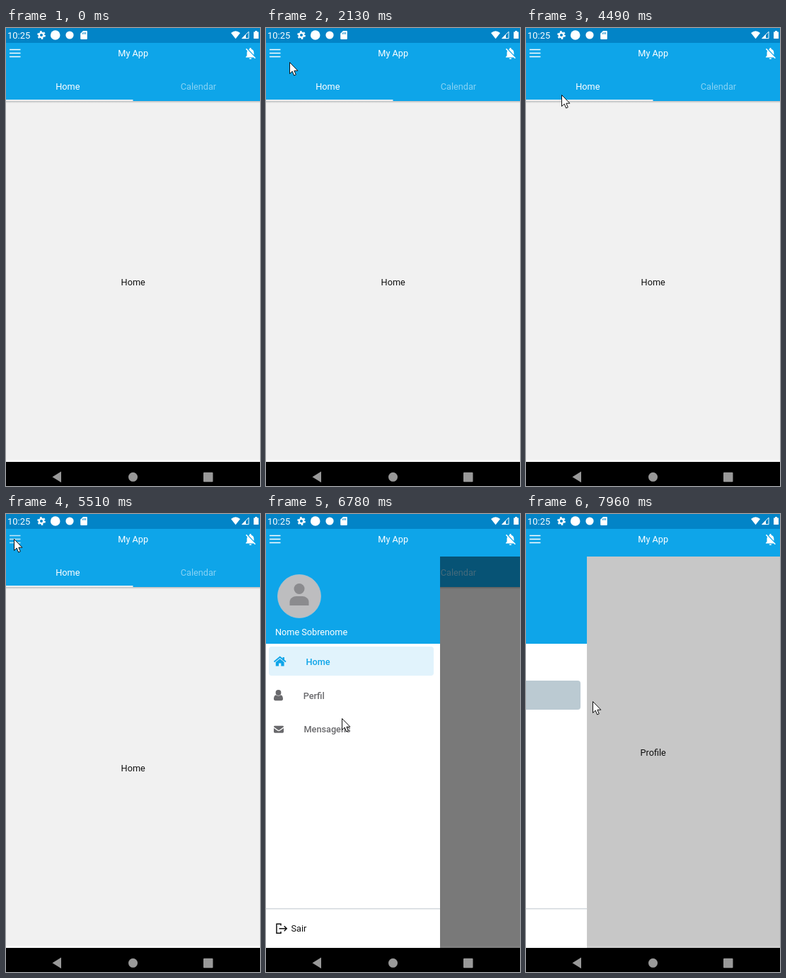
An HTML page for the animation above (8 s loop, 359 px wide and 646 px high).

```html
<!DOCTYPE html>
<html lang="en">
<head>
<meta charset="utf-8">
<title>Drawer and tabs demo</title>
<style>
  html, body { margin: 0; width: 100%; height: 100%; overflow: hidden; }
  svg { display: block; width: 100%; height: 100%; }
  text { font: 12.7px Roboto, sans-serif; }
  .mid { text-anchor: middle; }
  .item text { font-weight: 500; }
  .item { color: #69696c; fill: currentColor; }
  .item rect { fill: none; }
  .item.active { color: #0ea5e9; }
  .item.active rect { fill: #e1f3fc; }
</style>
</head>
<body>
<svg viewBox="0 0 359 646">
  <defs>
    <clipPath id="leftTab"><path d="M0 60h179.5v43H0z"/></clipPath>
    <clipPath id="rightTab"><path d="M179.5 60H359v43H179.5z"/></clipPath>
    <clipPath id="profileRow"><rect x="4" y="235" width="233" height="41" rx="4"/></clipPath>
    <linearGradient id="shade" x2="0" y2="1">
      <stop stop-opacity=".22"/><stop offset="1" stop-opacity="0"/>
    </linearGradient>
  </defs>
  <rect width="359" height="646" fill="#f1f1f1"/>
  <path d="M0 609h359v3H0z" fill="#fafafa"/>

  <g id="tabs">
    <text class="mid" id="homePage" x="179.7" y="362.5" fill="#111">Home</text>
    <text class="mid" id="calendarPage" x="179.7" y="362.5" fill="#111">Calendar</text>
    <path d="M0 103h359v3H0z" fill="url(#shade)"/>
    <path d="M0 60h359v43H0z" fill="#0ea5e9"/>
    <g clip-path="url(#leftTab)"><circle id="homeRipple" fill="#fff"/></g>
    <g clip-path="url(#rightTab)"><circle id="calendarRipple" fill="#fff"/></g>
    <g fill="#fff">
      <text class="mid" id="homeTab" x="87.3" y="87">Home</text>
      <text class="mid" id="calendarTab" x="272" y="87">Calendar</text>
    </g>
    <path id="indicator" d="M0 101h179.5v2H0z" fill="#e8eef1"/>
  </g>
  <text class="mid" id="profilePage" x="179.7" y="341" fill="#111">Profile</text>

  <rect id="dim" y="60" width="359" height="552"/>
  <g id="drawer">
    <path d="M0 60h246v552H0z" fill="#fff"/>
    <path d="M0 60h246v123H0z" fill="#0ea5e9"/>
    <circle cx="47" cy="116" r="30.5" fill="#bdbdbf" stroke="#a9c3d1" stroke-width=".8"/>
    <g fill="#8b8b8e">
      <circle cx="47" cy="105.5" r="7.5"/>
      <path d="M33.5 129v-5c0-5 5-8 9-8h9c4 0 9 3 9 8v5z"/>
    </g>
    <text x="13" y="171" fill="#fff">Nome Sobrenome</text>
    <g class="item" id="homeItem">
      <rect x="4" y="187" width="233" height="41" rx="4"/>
      <path d="M11.5 208.5 19.7 201.7 28 208.5" fill="none" stroke="currentColor" stroke-width="1.8"/>
      <path d="M23.6 202h2.3v5h-2.3zM13.8 209l5.9-4.8 5.9 4.8v5.5h-4.3v-4h-3.2v4h-4.3z"/>
      <text x="56.5" y="212.7">Home</text>
    </g>
    <g class="item" id="profileItem">
      <rect x="4" y="235" width="233" height="41" rx="4"/>
      <circle cx="17.5" cy="252" r="3.9"/>
      <path d="M14 255.3q3.5 2.6 7 0c2.2.5 3 3 3 5.7 0 1.4-1 2.2-2.2 2.2h-8.6c-1.2 0-2.2-.8-2.2-2.2 0-2.7.8-5.2 3-5.7z"/>
      <text x="52.7" y="260.5">Perfil</text>
    </g>
    <g clip-path="url(#profileRow)"><circle id="profileRipple"/></g>
    <g class="item">
      <path d="M11 300.2q0-1.4 1.4-1.4h11.2q1.4 0 1.4 1.4l-5.8 4.3q-1.2.8-2.4 0zM11 301.9l5 3.6q2 1.4 4 0l5-3.6v5.4q0 1.4-1.4 1.4H12.4q-1.4 0-1.4-1.4z"/>
      <text x="53.5" y="308.3">Mensagens</text>
    </g>
    <path d="M0 556h246v1.6H0z" fill="#d3d9dd"/>
    <path d="M21 580.5v-2.2h-6v13h6v-2.2M18.5 584.8H29M25.7 581.3l3.5 3.5-3.5 3.5" fill="none" stroke="#111" stroke-width="1.5"/>
    <text x="35.5" y="589.3" fill="#111">Sair</text>
  </g>

  <path d="M0 0h359v21H0z" fill="#0284c7"/>
  <path d="M0 21h359v39H0z" fill="#0ea5e9"/>
  <g fill="#fff">
    <text x="2" y="15" style="font-size:13px">10:25</text>
    <g fill="none" stroke="#fff">
      <circle cx="50" cy="10" r="3.2" stroke-width="2.4"/>
      <circle cx="50" cy="10" r="5" stroke-width="1.8" stroke-dasharray="2.6 2.636"/>
    </g>
    <circle cx="69.7" cy="10" r="6.8"/>
    <circle cx="90" cy="10" r="5.6"/>
    <path d="M109 4h4.8q1 0 1 1v10q0 1-1 1h-7.6q-1 0-1-1V7.8z"/>
    <path d="M108.2 6.6v2.2M110.3 6v2.8M112.4 6v2.8" stroke="#0284c7"/>
    <path d="M318 7q6.5-5.4 13 0l-6.5 8.3z"/>
    <path d="M333.8 14.6 343 5.2v9.4z" fill="none" stroke="#fff"/>
    <path d="M333 15l6-6v6zM350 5.5h2V4h3v1.5h2V15h-7z"/>
    <text class="mid" x="179.7" y="40">My App</text>
    <path id="menu" d="M5 29.8h15.5v1.5H5zM5 34.8h15.5v1.5H5zM5 39.8h15.5v1.5H5z"/>
    <path transform="translate(335.6 26) scale(.82)" d="M20 18.69 7.84 6.14 5.27 3.49 4 4.76l2.8 2.8c-.52.99-.8 2.16-.8 3.43v5l-2 2v1h13.73l2 2L21 19.72zM12 22c1.1 0 2-.9 2-2h-4c0 1.1.9 2 2 2zm6-7.32V11c0-3.08-1.64-5.64-4.5-6.32V4c0-.83-.67-1.5-1.5-1.5s-1.5.67-1.5 1.5v.68q-.8.2-1.44.55z"/>
  </g>
  <path d="M0 612h359v34H0z"/>
  <g fill="#999">
    <path d="M78 625.5v15.5l-12.5-7.7z"/>
    <circle cx="179.5" cy="633.3" r="6.5"/>
    <rect x="279" y="626.8" width="13.5" height="13.5" rx="1"/>
  </g>
  <path id="cursor" d="M.5.5v16l3.7-3.4 2.5 5.9 2.6-1.1-2.4-5.7h5z" fill="#fff" stroke="#111"/>
</svg>
<script>
const LOOP = 8000;
const el = Object.fromEntries([...document.querySelectorAll("svg [id]")].map(e => [e.id, e]));

const bursts = [[530, 1870, 19], [2130, 2270, 2], [2470, 3740, 18],
  [4000, 5050, 15], [5310, 6920, 23], [7050, 7960, 13]];

// Cursor tip: time, x, y.
const path = [[530, 310, 608], [800, 290, 300], [1030, 255, 108], [1310, 163, 250],
  [1590, 80, 110], [1870, 22, 43], [2060, 22, 43], [2130, 33, 48], [2270, 265, 90],
  [2900, 265, 90], [3250, 250, 150], [3600, 108, 93], [3740, 90, 93], [4300, 86, 93],
  [4490, 50, 94], [4770, 11, 41], [5050, 11, 35], [5450, 11, 35], [5650, 56, 76],
  [6080, 75, 130], [6360, 70, 310], [6570, 40, 571], [6710, 198, 347], [6780, 107, 288],
  [6920, 100, 285], [7120, 106, 310], [7400, 94, 264], [LOOP, 94, 264]];

const clamp = v => Math.min(1, Math.max(0, v));
const progress = (t, start, length) => clamp((t - start) / length);
const easeOut = p => 1 - (1 - p) ** 3;
const settle = (t, start) => t < start ? 0 : 1 - Math.exp((start - t) / 100);
const shift = (e, x, y = 0) => e.setAttribute("transform", `translate(${x} ${y})`);
const show = (e, visible) => e.style.display = visible ? "" : "none";

function snap(t) {
  const burst = bursts.findLast(b => b[0] <= t);
  if (!burst) return 0;
  const [start, end, steps] = burst;
  const step = (end - start) / steps;
  return start + Math.min(steps, Math.floor((t - start) / step + 0.01)) * step;
}

function cursorAt(t) {
  const i = Math.max(1, path.findIndex(p => p[0] >= t));
  const [a, b] = [path[i - 1], path[i]];
  const p = progress(t, a[0], b[0] - a[0]);
  return [a[1] + (b[1] - a[1]) * p, a[2] + (b[2] - a[2]) * p];
}

function ripple(e, t, start, x, y, alpha, fadeStart = Infinity) {
  const grow = easeOut(progress(t, start - 40, 250));
  e.setAttribute("cx", x);
  e.setAttribute("cy", y);
  e.setAttribute("r", t < start ? 0 : 150 * grow);
  e.setAttribute("opacity", alpha * (1 - progress(t, fadeStart, 400)));
}

function render(time) {
  const t = snap(time);

  const page = easeOut(progress(t, 2600, 340)) - easeOut(progress(t, 4120, 340));
  shift(el.homePage, -359 * page);
  shift(el.calendarPage, 359 * (1 - page));
  shift(el.indicator, 179.5 * page);
  el.homeTab.setAttribute("opacity", 1 - 0.5 * page);
  el.calendarTab.setAttribute("opacity", 0.5 + 0.5 * page);
  ripple(el.calendarRipple, t, 2470, 265, 90, 0.14, 2900);
  ripple(el.homeRipple, t, 4000, 90, 93, 0.14, 4080);

  const open = settle(t, 5490) * (1 - settle(t, 7855));
  const onProfile = t >= 7885;
  shift(el.drawer, 246 * (open - 1));
  show(el.drawer, open > 0);
  el.dim.setAttribute("opacity", open / 2);
  show(el.tabs, !onProfile);
  show(el.profilePage, onProfile);
  el.homeItem.classList.toggle("active", !onProfile);
  el.profileItem.classList.toggle("active", onProfile);
  ripple(el.profileRipple, t, 7610, 94, 264, 0.17);
  el.menu.setAttribute("opacity", t >= 5310 && t < 5750 ? 0.75 : 1);

  show(el.cursor, t >= 530);
  shift(el.cursor, ...cursorAt(t));
}

const begin = performance.now();
function frame() {
  render((performance.now() - begin) % LOOP);
  requestAnimationFrame(frame);
}
frame();
</script>
</body>
</html>
```
